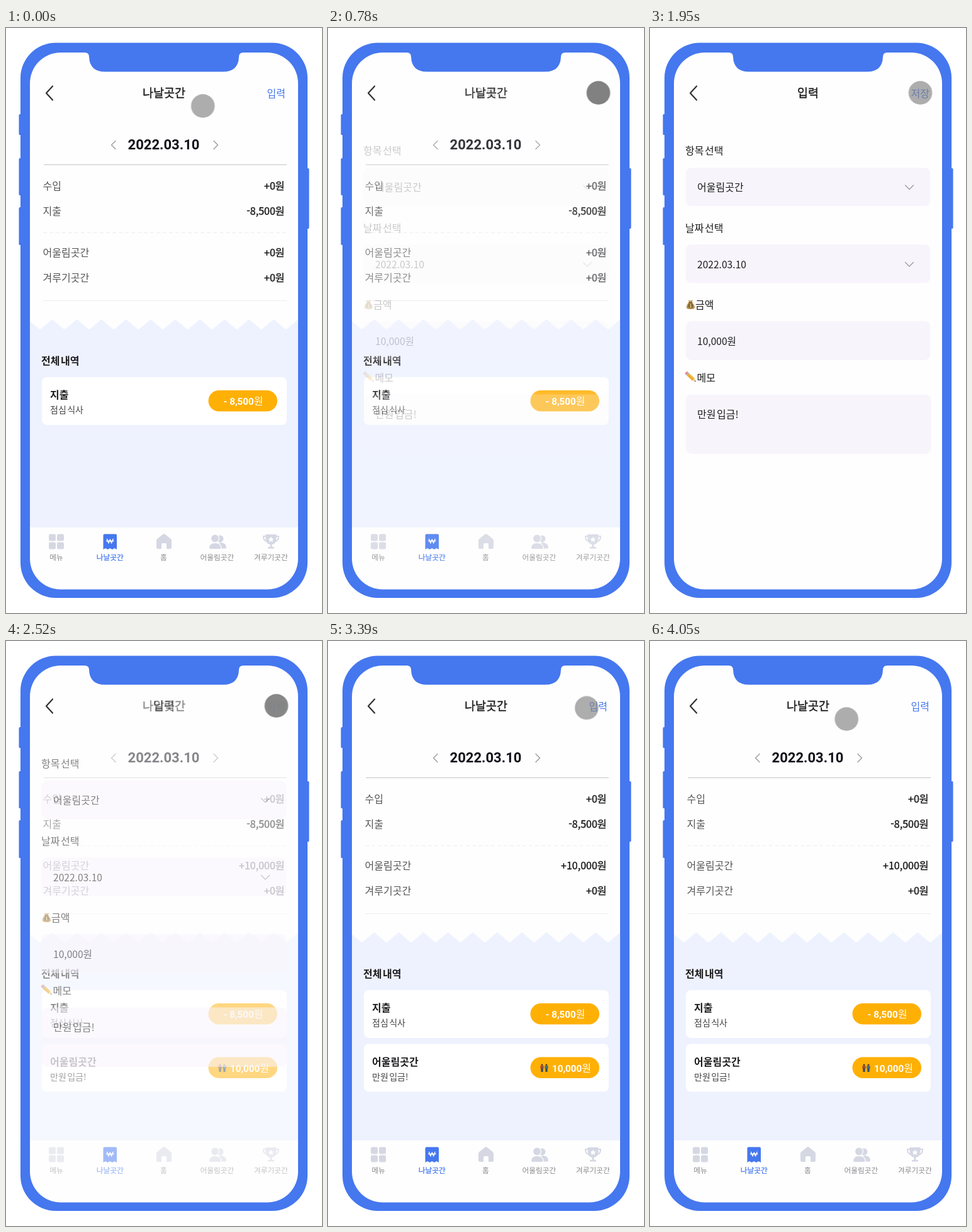
An HTML page that plays this animation: 502x930 px, repeating every 4.35 s.

```html
<!DOCTYPE html>
<html lang="ko">
<head>
<meta charset="utf-8">
<title>가계부 입력</title>
<style>
  html, body { margin: 0; width: 100%; height: 100%; overflow: hidden; background: #fff; }
  svg { display: block; width: 100%; height: 100%; }
  text { font: 400 16px "Noto Sans CJK KR", "Noto Sans CJK", sans-serif; fill: #1c1c1e; word-spacing: -.18em; }
  /* a hairline stroke gives the medium weight */
  .title, .value, .tab.on { stroke: #1c1c1e; stroke-width: .4; }
  .title { font-size: 18.5px; text-anchor: middle; }
  .action { fill: #4577ef; }
  .date { font: 700 22px Roboto, sans-serif; fill: #111118; text-anchor: middle; }
  .label { fill: #555; }
  .value { text-anchor: end; }
  .strong { font-weight: 700; }
  .note { font-size: 14px; fill: #444; }
  .won { fill: #fff; text-anchor: end; }
  .num { font: 700 15.2px Roboto, sans-serif; word-spacing: 0; }
  .figure { font-size: 15.6px; }
  .tab { font-size: 11.7px; fill: #8a8a8e; text-anchor: middle; }
  .tab.on { fill: #4577ef; stroke: #4577ef; stroke-width: .25; }
  .line { fill: none; stroke-linecap: round; stroke-linejoin: round; }
  .thin { stroke: #99999d; stroke-width: 1.3; }
  .card { fill: #fff; }
  .pill { fill: #ffb005; }
  .field { fill: #f7f5fb; }
  .icon { fill: #d5d8e3; }

  .day, .form, .before, .after, .touch, .dot { animation: 4350ms linear infinite; }
  .day { animation-name: day; }
  .form { animation-name: form; }
  .before { animation-name: before; animation-timing-function: step-end; }
  .after { animation-name: after; animation-timing-function: step-end; }
  .touch { animation-name: move; }
  .dot { animation-name: press; fill: #818181; }

  @keyframes day {
    0%, 14.1% { opacity: 1; }
    17.93% { opacity: .86; }
    21.38% { opacity: .1; }
    23.45%, 52.74% { opacity: 0; }
    56.55% { opacity: .22; }
    60% { opacity: .92; }
    62.07%, 100% { opacity: 1; }
  }
  @keyframes form {
    0%, 14.1% { opacity: 0; }
    17.93% { opacity: .23; }
    21.38% { opacity: .95; }
    23.45%, 52.74% { opacity: 1; }
    56.55% { opacity: .86; }
    60% { opacity: .1; }
    62.07%, 100% { opacity: 0; }
  }
  @keyframes before { 0% { visibility: visible; } 40%, 100% { visibility: hidden; } }
  @keyframes after { 0% { visibility: hidden; } 40%, 100% { visibility: visible; } }
  @keyframes move {
    0% { transform: translate(312.2px, 124px); animation-timing-function: ease-out; }
    8.5%, 77.1% { transform: translate(429.5px, 103px); animation-timing-function: ease-out; }
    85.75%, 100% { transform: translate(312.2px, 124px); }
  }
  @keyframes press {
    0%, 13.8% { opacity: .65; }
    17.93% { opacity: 1; }
    21.38% { opacity: .87; }
    24.83%, 52.41% { opacity: .65; }
    56.55% { opacity: 1; }
    60% { opacity: .87; }
    63.45%, 100% { opacity: .65; }
  }
</style>
</head>
<body>
<svg viewBox="0 0 502 930">
  <defs>
    <pattern id="teeth" x="34.3" y="463" width="39.1" height="17" patternUnits="userSpaceOnUse">
      <path d="M0 0H39.1L21.5 15Q19.55 16.8 17.6 15Z" fill="#fefefe"/>
    </pattern>
  </defs>

  <!-- phone -->
  <g fill="#4577ef">
    <rect x="20.5" y="137" width="6" height="33" rx="1.5"/>
    <rect x="20.5" y="207" width="6" height="59" rx="1.5"/>
    <rect x="20.5" y="285" width="6" height="60" rx="1.5"/>
    <rect x="475" y="223" width="6.5" height="96" rx="1.5"/>
    <rect x="23" y="23.5" width="456" height="882.5" rx="56"/>
    <rect x="38" y="39" width="426" height="853.5" rx="49" fill="#fefefe"/>
    <path d="M125 38V39Q132 39 132 46Q133 69.5 157 69.5H345Q369 69.5 370 46Q370 39 377 39V38Z"/>
  </g>
  <path class="line" d="M74 92.5L64 103.5L74 114.5" stroke="#333" stroke-width="2.2"/>

  <!-- daily summary -->
  <g class="day">
    <text class="title" x="251" y="109.5">나날곳간</text>
    <text class="action" x="414.5" y="109.5">입력</text>
    <text class="date" x="250.5" y="193">2022.03.10</text>
    <path class="line thin" d="M174 179.5L167.5 186L174 192.5M330 179.5L336.5 186L330 192.5"/>
    <path d="M60 217.3H446" stroke="#cdcdcf" stroke-width="1.3"/>
    <path d="M59 325.5H446" stroke="#ededf0" stroke-dasharray="6 4"/>
    <path d="M59 433.5H446" stroke="#ededf0"/>

    <text class="label" x="58.5" y="257">수입</text>
    <text class="value" x="442.5" y="257">+0원</text>
    <text class="label" x="58.5" y="297.3">지출</text>
    <text class="value" x="442.5" y="297.3">-8,500원</text>
    <text class="label" x="58.5" y="362.5">어울림곳간</text>
    <text class="value before" x="442.5" y="362.5">+0원</text>
    <text class="value after" x="442.5" y="362.5">+10,000원</text>
    <text class="label" x="58.5" y="402.8">겨루기곳간</text>
    <text class="value" x="442.5" y="402.8">+0원</text>

    <rect x="38" y="463" width="426" height="331" fill="#eef2ff"/>
    <rect x="38" y="463" width="426" height="17" fill="url(#teeth)"/>
    <text class="strong" x="56" y="534.5">전체 내역</text>

    <rect class="card" x="57" y="555" width="389" height="76" rx="8"/>
    <text class="strong" x="70" y="589">지출</text>
    <text class="note" x="70" y="612">점심 식사</text>
    <rect class="pill" x="321.5" y="576" width="109.5" height="33.5" rx="16.75"/>
    <text class="won" x="408.5" y="599"><tspan class="num">- 8,500</tspan>원</text>

    <g class="after">
      <rect class="card" x="57" y="640.5" width="389" height="76" rx="8"/>
      <text class="strong" x="70" y="674.5">어울림곳간</text>
      <text class="note" x="70" y="697.5">만원 입금!</text>
      <rect class="pill" x="321.5" y="661.5" width="109.5" height="33.5" rx="16.75"/>
      <g fill="#3b4a63">
        <path d="M338 676h4l-.4 9h-3.2zM345 676h4l-.4 9h-3.2z"/>
        <path d="M337.3 675.5h5.400v4h-5.400z" fill="#a4492f"/>
        <path d="M344.300 675.5h5.400v4h-5.400z" fill="#3a6f8f"/>
        <circle cx="340" cy="674" r="1.6" fill="#5a3b28"/>
        <circle cx="347" cy="674" r="1.6" fill="#5a3b28"/>
      </g>
      <text class="won" x="418" y="684.5"><tspan class="num">10,000</tspan>원</text>
    </g>

    <!-- tab bar -->
    <g class="icon">
      <rect x="68" y="804.5" width="11" height="11" rx="2.5"/>
      <rect x="81" y="804.5" width="11" height="11" rx="2.5"/>
      <rect x="68" y="817.5" width="11" height="11" rx="2.5"/>
      <rect x="81" y="817.5" width="11" height="11" rx="2.5"/>
      <path d="M239 815Q239 813 240.5 812L249 805Q251 803.5 253 805L261.5 812Q263 813 263 815V826Q263 828 261 828H255V821Q255 819 253 819H249Q247 819 247 821V828H241Q239 828 239 826Z"/>
      <circle cx="340" cy="812" r="5.5"/>
      <path d="M337 827.5Q336 818 342 818Q350 819 350 826Q350 827.5 348 827.5Z"/>
      <g stroke="#fefefe" stroke-width="1.2">
        <circle cx="332" cy="811.5" r="6.5"/>
        <path d="M322.5 826Q323 818.5 332 818.5Q341 818.5 342 826Q342 828.5 340 828.5H324.5Q322.5 828.5 322.5 826Z"/>
      </g>
      <path d="M412.5 805H429.5V811Q429.5 820 422.5 821V825H426V827.5H416V825H419.5V821Q412.5 820 412.5 811Z"/>
      <path class="line" d="M412.5 808H409Q409 815.5 414.5 816M429.5 808H433Q433 815.5 427.5 816" stroke="#d5d8e3" stroke-width="2"/>
      <path d="M421 808.5l1.4 2.9 3.2.4-2.3 2.2.6 3.2-2.9-1.6-2.9 1.6.6-3.2-2.3-2.2 3.2-.4z" fill="#fff"/>
    </g>
    <path d="M154.5 806.5Q154.5 804.5 156.5 804.5H174Q176 804.5 176 806.5V829L172.4 827L168.8 829L165.2 827L161.6 829L158 827L154.5 829Z" fill="#4577ef"/>
    <path class="line" d="M160.5 812.5L163 819L165.3 813L167.6 819L170 812.5M159.5 815.5H171" stroke="#fff" stroke-width="1.4"/>
    <text class="tab" x="80" y="846">메뉴</text>
    <text class="tab on" x="165.3" y="846">나날곳간</text>
    <text class="tab" x="250.3" y="846">홈</text>
    <text class="tab" x="335.5" y="846">어울림곳간</text>
    <text class="tab" x="420.8" y="846">겨루기곳간</text>
  </g>

  <!-- entry form -->
  <g class="form">
    <text class="title" x="251" y="109.5">입력</text>
    <text class="action" x="414.5" y="109.5">저장</text>

    <text x="56" y="201">항목 선택</text>
    <rect class="field" x="56.5" y="222" width="389" height="61" rx="9"/>
    <text x="75" y="259">어울림곳간</text>

    <text x="56" y="323.5">날짜 선택</text>
    <rect class="field" x="56.5" y="344" width="389" height="61.5" rx="9"/>
    <text class="figure" x="75" y="381.5">2022.03.10</text>
    <path class="line thin" d="M405.5 250L412 256.5L418.5 250M405.5 372.5L412 379L418.5 372.5"/>

    <g>
      <path d="M61.5 436Q57.5 441 58 444.5Q58.5 447 64.5 447Q70.5 447 71 444.5Q71 441 67 436Z" fill="#b98d4c"/>
      <path d="M61 432.5L64.5 433.5L68 432L66.8 436H62Z" fill="#c9a063"/>
      <path d="M61.5 436.3H67.3" stroke="#6d4a24" stroke-width="1.3"/>
      <circle cx="64.5" cy="441.5" r="3.7" fill="#6b5a2c"/>
      <path class="line" d="M66 440Q63 438.6 63 440.3Q63 441.2 64.5 441.5Q66.2 442 66 443Q65.5 444.3 63 443.2M64.5 438.6V444.6" stroke="#e5cf8c" stroke-width=".8"/>
    </g>
    <text x="72" y="445.5">금액</text>
    <rect class="field" x="56.5" y="466" width="389" height="62" rx="9"/>
    <text class="figure" x="75" y="503.5">10,000원</text>

    <g transform="translate(57 547.5) rotate(43)">
      <rect y="-2.7" width="3" height="5.4" rx="1" fill="#e58a8a"/>
      <rect x="3" y="-2.7" width="2" height="5.4" fill="#a9b0b6"/>
      <rect x="5" y="-2.7" width="11.5" height="5.4" fill="#f3b93d"/>
      <path d="M5 1H16.5" stroke="#d8922b"/>
      <path d="M16.5 -2.7L21.5 0L16.5 2.7Z" fill="#ecd0a2"/>
      <path d="M19.7 -1L21.5 0L19.7 1Z" fill="#333"/>
    </g>
    <text x="74.5" y="561.5">메모</text>
    <rect class="field" x="56.5" y="582.5" width="390" height="94.5" rx="9"/>
    <text x="75" y="620">만원 입금!</text>
  </g>

  <g class="touch"><circle class="dot" r="18.8"/></g>
</svg>
</body>
</html>
```
